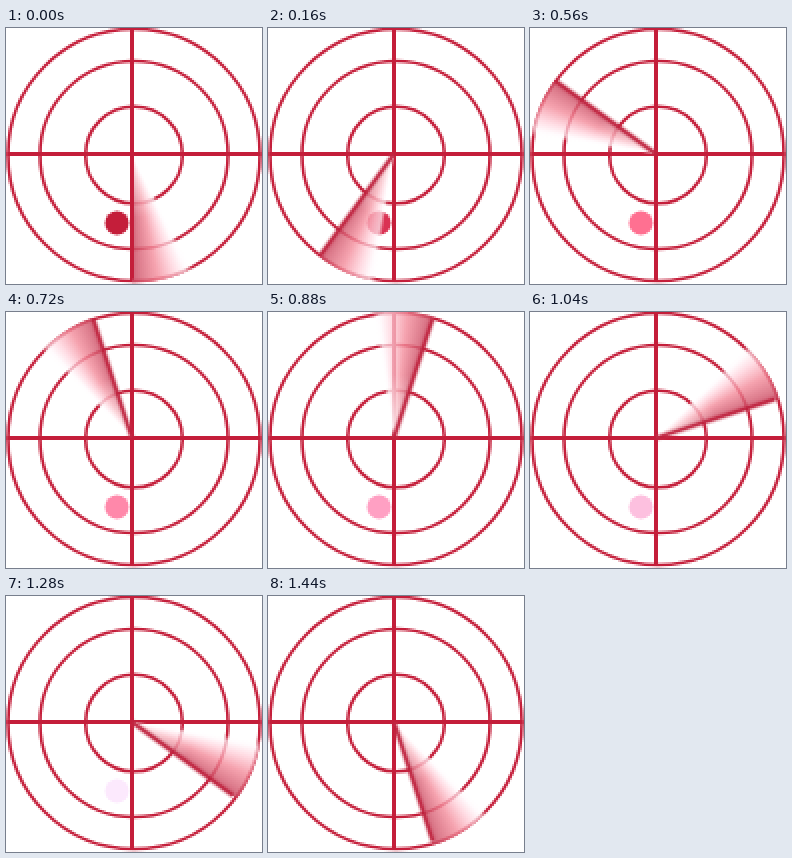
Recreate the animation shown at these times as an HTML page with a canvas. Size 256 by 256 pixels, loop 1.52 s.

```html
<!DOCTYPE html>
<html lang="en">
<head>
<meta charset="utf-8">
<title>Radar sweep</title>
<style>
  html, body { margin: 0; width: 100%; height: 100%; overflow: hidden; background: #fff; }
  canvas { display: block; width: 256px; height: 256px; image-rendering: pixelated; }
</style>
</head>
<body>
<canvas id="radar" width="128" height="128"></canvas>
<script>
// Coarse pixels: a 128 px canvas shown at double size, drawn in 256 px units
const ctx = document.getElementById('radar').getContext('2d');
ctx.scale(0.5, 0.5);

const RED = '#c41e3a';
const STEP = 80, STEPS = 19;
const CX = 126, CY = 126;
const TAU = Math.PI * 2;
const TAIL = 28 * Math.PI / 180;

// Echo colour: [step, r, g, b]
const FADE = [
  [0, 196, 30, 58], [4, 240, 70, 108], [7, 255, 112, 145], [11, 255, 160, 195],
  [14, 252, 208, 237], [16, 252, 233, 253], [18, 255, 255, 255]
];

// Sweep colour from the leading edge back to the end of the tail
const GLOW = [
  [0, 'rgba(200,70,95,.85)'], [0.15, 'rgba(214,95,115,.8)'],
  [0.42, 'rgba(243,140,155,.8)'], [0.7, 'rgba(255,208,218,.75)'],
  [0.88, 'rgba(255,248,251,.7)'], [1, 'rgba(255,255,255,0)']
];

function ring(r) {
  ctx.beginPath();
  ctx.arc(128, 127, r, 0, TAU);
  ctx.stroke();
}

function line(x1, y1, x2, y2) {
  ctx.beginPath();
  ctx.moveTo(x1, y1);
  ctx.lineTo(x2, y2);
  ctx.stroke();
}

function grid() {
  ctx.strokeStyle = RED;
  ctx.lineWidth = 3.2;
  [126, 94, 48.5].forEach(ring);
  ctx.lineWidth = 4;
  line(CX, 0, CX, 254);
  line(1, CY, 255, CY);
}

function echoColor(step) {
  let i = 0;
  while (i < FADE.length - 2 && step > FADE[i + 1][0]) i++;
  const a = FADE[i], b = FADE[i + 1];
  const k = (step - a[0]) / (b[0] - a[0]);
  const mix = n => Math.round(a[n] + (b[n] - a[n]) * k);
  return `rgb(${mix(1)},${mix(2)},${mix(3)})`;
}

function sector(angle, radius, fill) {
  ctx.fillStyle = fill;
  ctx.beginPath();
  ctx.moveTo(CX, CY);
  ctx.arc(CX, CY, radius, angle - TAIL, angle);
  ctx.fill();
}

function beam(angle, width, color) {
  ctx.strokeStyle = color;
  ctx.lineWidth = width;
  line(CX, CY, CX + Math.cos(angle) * 125, CY + Math.sin(angle) * 125);
}

function sweep(angle) {
  const glow = ctx.createConicGradient(angle - Math.PI, CX, CY);
  for (const [pos, color] of GLOW) {
    glow.addColorStop(0.5 - pos * TAIL / TAU, color);
  }
  // The glow pales towards the hub
  const hub = ctx.createRadialGradient(CX, CY, 12, CX, CY, 64);
  hub.addColorStop(0, 'rgba(255,255,255,.7)');
  hub.addColorStop(1, 'rgba(255,255,255,0)');

  ctx.save();
  ctx.beginPath();
  ctx.arc(128, 127, 127.5, 0, TAU);
  ctx.clip();
  sector(angle, 130, glow);
  sector(angle, 64, hub);
  ctx.restore();

  if (Math.abs(Math.sin(2 * angle)) < 0.01) {
    beam(angle, 4, RED);
  } else {
    beam(angle, 7, 'rgba(200,60,85,.3)');
    beam(angle, 3.5, 'rgba(190,30,58,.85)');
  }
}

function draw(time) {
  const step = Math.floor(time / STEP) % STEPS;
  // The beam turns 18 degrees per step and skips one position after step 12
  const turn = step > 12 ? step + 1 : step;
  ctx.fillStyle = '#fff';
  ctx.fillRect(0, 0, 256, 256);
  ctx.fillStyle = echoColor(step);
  ctx.beginPath();
  ctx.arc(111, 195, 12, 0, TAU);
  ctx.fill();
  grid();
  sweep((90 + turn * 18) * Math.PI / 180);
}

const start = performance.now();
function tick() {
  draw(performance.now() - start);
  requestAnimationFrame(tick);
}
tick();
</script>
</body>
</html>
```
